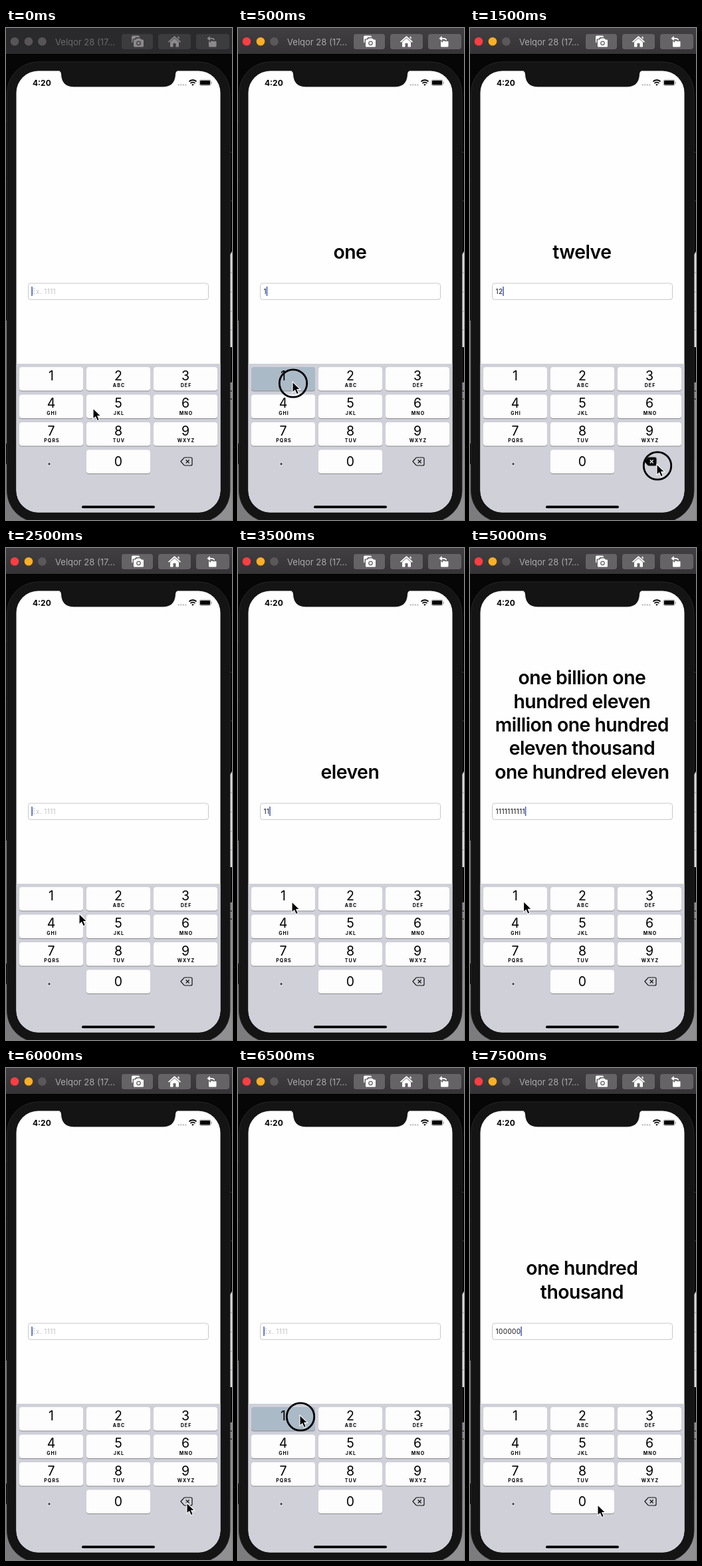
Animation, 340 px wide and 740 px high, one loop 8 s. Source, as an HTML page:

```html
<!DOCTYPE html>
<html lang="en">
<head>
<meta charset="utf-8">
<title>Number speller</title>
<style>
  html, body { margin: 0; width: 100%; height: 100%; overflow: hidden; background: #060606; }
  svg { display: block; width: 340px; height: 740px; font-family: Inter, "Liberation Sans", sans-serif; }
  .words { font-size: 28.4px; font-weight: 600; letter-spacing: -.5px; text-anchor: middle; }
  .digit { font-size: 19.5px; text-anchor: middle; }
  .letters { font-size: 7px; font-weight: 700; letter-spacing: 1.1px; text-anchor: middle; }
  .entry { font-size: 10.1px; letter-spacing: .35px; }
</style>
</head>
<body>
<svg viewBox="0 0 340 740">
  <defs>
    <clipPath id="screen"><rect x="15.500" y="64.500" width="307" height="664" rx="33"/></clipPath>
    <linearGradient id="bar" x2="0" y2="1">
      <stop offset="0" stop-color="#413f41"/><stop offset="1" stop-color="#353335"/>
    </linearGradient>
  </defs>

  <!-- desktop showing around the device -->
  <rect width="340" height="740" fill="#060606"/>
  <path d="M340 336L334 346V480H340Z" fill="#dededf"/>
  <path d="M334 368h6M334 397h6M334 426h6M334 454h6" stroke="#aaa"/>
  <path d="M334 533h6V740H334Z" fill="#8e8e90"/>
  <path d="M334 546h6M334 558h6" stroke="#444" stroke-width="2"/>
  <path d="M290 740H340V650Z" fill="#909092"/>
  <path d="M0 440h3V625H0ZM0 655V740H50Z" fill="#7c7c7e"/>
  <path d="M0 140h3M0 230h3M337 187h3M337 260h3" stroke="#333"/>

  <g id="bar-group">
    <rect id="bar-fill" width="340" height="39"/>
    <path d="M0 39.5H340" stroke="#000"/>
    <g id="lights"></g>
    <text id="title" x="74" y="25.5" font-size="13">Velqor 28 (17...</text>
    <g id="buttons">
      <rect x="174" y="9" width="47" height="23" rx="4"/>
      <rect x="229" y="9" width="49" height="23" rx="4"/>
      <rect x="286" y="9" width="50" height="23" rx="4"/>
    </g>
    <g id="icons">
      <rect x="189" y="11.500" width="12" height="11" rx="2"/>
      <path class="cut" d="M190.500 16.500h3l2-2.500h7l2 2.500h3v13.500h-17z"/>
      <path d="M193 17.500h2l2-2h5l2 2h2q1 0 1 1v9q0 1-1 1h-13q-1 0-1-1v-9q0-1 1-1z"/>
      <circle class="cut" cx="199.500" cy="22.800" r="3.400"/>
      <circle cx="199.500" cy="22.800" r="2.100"/>
      <path d="M244 20.500L253.500 12L263 20.500L261.800 21.700L253.500 14.500L245.200 21.700ZM258.500 13h2v4l-2-2z"/>
      <path d="M247 21L253.500 15.500L260 21V28.500H255.500V23H251.500V28.500H247Z"/>
      <rect x="305" y="19.500" width="11.500" height="9" rx="1.500"/>
      <path class="cut" d="M301 15.800L308 10V13.500H311Q315.500 13.500 315.500 20H311V18.500H308V22Z"/>
      <path d="M302.500 15.800L306.800 12V15H310Q314 15 314 18.500H312.500Q312.500 16.700 310 16.700H306.800V19.500Z"/>
    </g>
  </g>

  <!-- device -->
  <rect x="1.500" y="51" width="335.500" height="692" rx="47" fill="#141415" stroke="#242425"/>
  <g clip-path="url(#screen)">
    <rect x="15" y="64" width="308" height="665" fill="#fefefe"/>
    <rect x="15" y="505" width="308" height="224" fill="#cfd0d8"/>
  </g>
  <path d="M77 63Q83 64.500 83 70Q84 88.500 102 88.500H236Q254 88.500 255 70Q255 64.500 261 63Z" fill="#141415"/>
  <text x="40" y="87" font-size="12" font-weight="700">4:20</text>
  <path d="M258.500 85.500H272" stroke="#bbb" stroke-width="2" stroke-dasharray="2.300 1.300"/>
  <g fill="none" stroke="#000" stroke-width="1.800">
    <path d="M275.500 80.500Q281 76 286.500 80.500M277.500 83Q281 80.200 284.500 83"/>
    <path d="M281 86.500L279.600 85Q281 84 282.400 85Z" fill="#000" stroke-width=".6"/>
  </g>
  <rect x="291" y="78" width="17" height="8.500" rx="2.200" fill="none" stroke="#888" stroke-width=".8"/>
  <rect x="292" y="79" width="15" height="6.500" rx="1.200"/>
  <path d="M309 81v3q1-.5 1-1.500t-1-1.500z" fill="#888"/>
  <rect x="114" y="718.500" width="110" height="3.800" rx="1.900"/>

  <g id="words" class="words"></g>
  <rect x="33.500" y="384" width="271" height="24.500" rx="3.500" fill="#fff" stroke="#c9c9cb"/>
  <text id="entry" class="entry" x="38.500" y="400"></text>
  <rect id="caret" y="389" width="1.500" height="14" fill="#3d58cd"/>

  <g id="keys"></g>
  <text class="digit" x="65" y="656.500">.</text>
  <path id="delete" d="M263 652L267.500 646.800Q268.200 646 269.200 646H278Q280 646 280 648V656Q280 658 278 658H269.200Q268.200 658 267.500 657.200Z" stroke="#111" stroke-width="1.200"/>
  <path id="cross" d="M270.700 649.500l5 5m0-5l-5 5" stroke-width="1.200"/>

  <g id="pointer">
    <circle id="ring" cx="1" cy="2.500" r="20.700" fill="none" stroke="#000" stroke-width="2.800"/>
    <path d="M0 0V16.200L3.700 12.800L6.300 18.700L9.300 17.400L6.800 11.600H11.800Z" stroke="#fff" stroke-width="1.100"/>
  </g>
</svg>
<script>
const $ = id => document.getElementById(id);
const STEP = 500;
const BILLION = "one billion one|hundred eleven|million one hundred|eleven thousand|one hundred eleven";

// typed digits, spelled lines, pointer x, pointer y, pressed key
const states = [
  ["", "", 131, 572],
  ["1", "one", 82, 532, "1"],
  ["12", "twelve", 180, 534],
  ["12", "twelve", 281, 656, "delete"],
  ["", "", 281, 656],
  ["", "", 110, 550],
  ["1", "one", 81, 532, "1"],
  ["11", "eleven", 81, 532],
  ["1111", "one thousand one|hundred eleven", 81, 532],
  ["1111111", "one million one|hundred eleven|thousand one|hundred eleven", 80.6, 531.6, "1"],
  ["1111111111", BILLION, 80.6, 531.6],
  ["1111111111", BILLION, 272, 654, "delete"],
  ["", "", 272, 654],
  ["", "", 93, 522, "1"],
  ["10", "ten", 192, 657, "0"],
  ["100000", "one hundred|thousand", 192, 657]
];

function add(parent, tag, attrs, text = "") {
  const el = document.createElementNS("http://www.w3.org/2000/svg", tag);
  for (const name in attrs) el.setAttribute(name, attrs[name]);
  el.textContent = text;
  parent.append(el);
  return el;
}

const lights = [13, 34, 54.5].map(cx => add($("lights"), "circle", { cx, cy: 20.3, r: 6.3 }));

const keyFaces = {};
const letters = ["", "ABC", "DEF", "GHI", "JKL", "MNO", "PQRS", "TUV", "WXYZ"];
function addKey(label, col, row, sub) {
  const x = 20 + col * 101, y = 510 + row * 41.5;
  const box = { x, width: 96, height: 35.5, rx: 3.8 };
  add($("keys"), "rect", { ...box, y: y + 1, fill: "#898a90" });
  keyFaces[label] = add($("keys"), "rect", { ...box, y });
  add($("keys"), "text", { class: "digit", x: x + 48, y: y + (row < 3 ? 19.6 : 24.6) }, label);
  add($("keys"), "text", { class: "letters", x: x + 49, y: y + 30 }, sub);
}
letters.forEach((sub, i) => addKey(String(i + 1), i % 3, Math.floor(i / 3), sub));
addKey("0", 1, 3, "");

const fill = (el, color) => el.setAttribute("fill", color);

function drawWindow(active) {
  fill($("bar-fill"), active ? "url(#bar)" : "#2a292b");
  fill($("title"), active ? "#aaa8aa" : "#6b696b");
  const button = active ? "#656365" : "#3c3b3d";
  fill($("buttons"), button);
  fill($("icons"), active ? "#fff" : "#8b898b");
  document.querySelectorAll(".cut").forEach(el => fill(el, button));
  const colors = active ? ["#fb3e42", "#fdae24", "#5a585a"] : Array(3).fill("#575557");
  lights.forEach((light, i) => fill(light, colors[i]));
}

function drawState(index) {
  const [typed, spelled, x, y, pressed] = states[index];
  drawWindow(index > 0);

  $("words").replaceChildren();
  const lines = spelled.split("|");
  lines.forEach((line, i) =>
    add($("words"), "text", { x: 168.4, y: 346.5 - (lines.length - 1 - i) * 35.3 }, line));

  $("entry").textContent = typed || "Ex. 1111";
  fill($("entry"), typed ? "#111" : "#c3c3c6");
  const end = typed ? $("entry").getComputedTextLength() : 0;
  $("caret").setAttribute("x", 38.3 + end);

  for (const label in keyFaces) fill(keyFaces[label], label === pressed ? "#abbac7" : "#fdfdfe");
  const deleting = pressed === "delete";
  fill($("delete"), deleting ? "#000" : "none");
  $("cross").setAttribute("stroke", deleting ? "#fff" : "#111");

  $("pointer").setAttribute("transform", `translate(${x} ${y})`);
  $("ring").style.display = pressed ? "" : "none";
}

const start = performance.now();
let shown = -1;
function tick() {
  const index = Math.floor((performance.now() - start) / STEP) % states.length;
  if (index !== shown) drawState(shown = index);
  requestAnimationFrame(tick);
}
tick();
</script>
</body>
</html>
```
